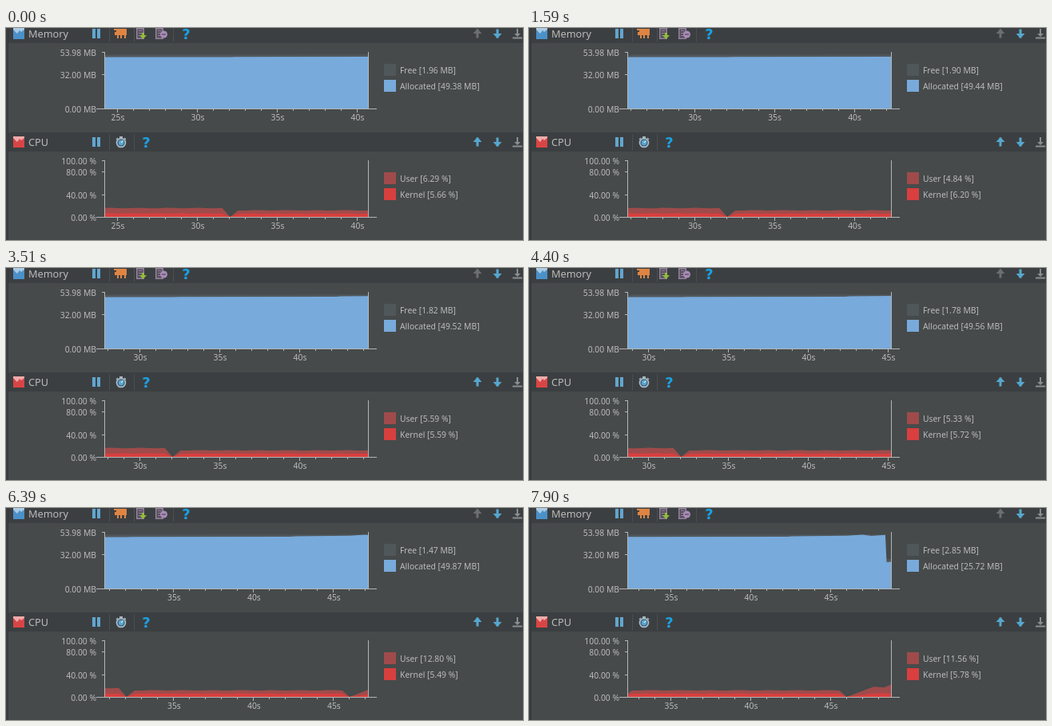
Animation, 647 px wide and 266 px high, one loop 7.99 s. Source, as an HTML page with a canvas:

```html
<!DOCTYPE html>
<html lang="en">
<head>
<meta charset="utf-8">
<title>Memory and CPU monitor</title>
<style>
html, body { margin: 0; width: 100%; height: 100%; overflow: hidden; background: #464a4a; }
canvas { display: block; width: 647px; height: 266px; }
</style>
</head>
<body>
<canvas id="stage"></canvas>
<script>
const W = 647, H = 266;
const LOOP = 7990, STEP_MS = 87.8, STEP_LEAD = 16;
const START_SEC = 40.675, STEP_SEC = 0.09;
const LEFT = 123, RIGHT = 453, PX_PER_SEC = 20, PLOT_H = 71;
const FONT = '"Noto Sans", "Open Sans", sans-serif';
const C = {
  head: '#3c3f41', body: '#464a4a', edge: '#343738', text: '#bbbbbb', axis: '#b4b6b6',
  free: '#50575b', alloc: '#78aadb', user: '#a04b4b', kernel: '#d93f3f',
  blue: '#56a8d0', pause: '#62a6d0', help: '#1ba1e2', gray: '#8a8d8e', off: '#6c6f70',
  orange: '#df8544', purple: '#95809f', green: '#91bd3a'
};

// Legend key points: second, allocated MB, user %, kernel %
const READINGS = [
  [40.5, 49.38, 6.29, 5.66], [41.5, 49.42, 4.65, 5.81], [43, 49.48, 5.23, 6.98],
  [44, 49.52, 5.59, 5.59], [45.5, 49.58, 5.2, 5.78], [46, 50.41, 0, 0],
  [47, 49.87, 12.8, 5.49], [48, 50.4, 12.1, 6.3], [48.5, 25.72, 11.56, 5.78]
];

// Chart series as [second, value]
const allocated = [
  [22, 48.95], [32.1, 48.95], [32.4, 49.3], [42.3, 49.4], [42.6, 49.75], [46, 50.3],
  [47, 51.4], [47.55, 50.1], [48.42, 51.2], [48.5, 25], [49, 25.72]
];
const totalMem = [[22, 51.34], [48.42, 51.6], [48.5, 28], [49, 28.57]];

const DIP = 16;
const totalCpu = [];
for (let k = 0; k < 44; k++) {
  const level = k < DIP ? 15.6 : 11.6;
  totalCpu.push([24.05 + k / 2, k === DIP ? 0 : level + 0.5 * Math.sin(k * 1.7)]);
}
totalCpu.push([46, 0], [47.7, 18], [48.35, 16.5], [48.8, 22]);
const kernelCpu = totalCpu.map(([t, v], k) => [t, Math.min(v / 2, 6 + 0.6 * Math.sin(k * 2.1))]);

const canvas = document.getElementById('stage');
const g = canvas.getContext('2d');
const dpr = window.devicePixelRatio || 1;
canvas.width = W * dpr;
canvas.height = H * dpr;
g.scale(dpr, dpr);

// Readings refresh every half second
function readingAt(sec) {
  const t = Math.min(Math.floor(sec * 2) / 2, READINGS[READINGS.length - 1][0]);
  const i = READINGS.findIndex(row => row[0] >= t);
  const b = READINGS[i], a = READINGS[Math.max(0, i - 1)];
  const f = a === b ? 0 : (t - a[0]) / (b[0] - a[0]);
  return a.map((v, j) => v + (b[j] - v) * f);
}

function rect(x, y, w, h, color) {
  g.fillStyle = color;
  g.fillRect(x, y, w, h);
}

function line(points, color, width = 1) {
  g.beginPath();
  points.forEach(([x, y]) => g.lineTo(x, y));
  g.strokeStyle = color;
  g.lineWidth = width;
  g.stroke();
}

function shape(points, color) {
  g.beginPath();
  points.forEach(([x, y]) => g.lineTo(x, y));
  g.fillStyle = color;
  g.fill();
}

function disc(x, y, r, color) {
  g.beginPath();
  g.arc(x, y, r, 0, Math.PI * 2);
  g.fillStyle = color;
  g.fill();
}

function text(str, x, y, align = 'left', font = `10.35px ${FONT}`, color = C.text) {
  g.font = font;
  g.textAlign = align;
  g.fillStyle = color;
  g.fillText(str, x, y);
}

function separator(x, cy) {
  for (let y = cy - 9; y < cy + 10; y += 2) rect(x, y, 1, 1, '#5c5f60');
}

// dir: -1 points up, 1 points down
function arrow(x, cy, dir, color) {
  rect(x - 1.5, cy - 5.5, 3, 11, color);
  shape([[x - 5.5, cy], [x + 5.5, cy], [x, cy + 6 * dir]], color);
}

function header(name, cy, iconColor, paleColor, upColor) {
  rect(0, cy - 12, W, 24, C.head);
  rect(9, cy - 7, 14, 14, iconColor);
  shape([[9, cy - 7], [23, cy - 7], [23, cy - 5], [19, cy - 2], [17, cy - 4], [14, cy], [9, cy - 5]], paleColor);
  text(name, 28, cy + 5, 'left', `500 12.7px ${FONT}`);
  rect(108, cy - 6, 4, 12, C.pause);
  rect(114, cy - 6, 4, 12, C.pause);
  separator(129, cy);
  separator(160, cy);
  arrow(590, cy, -1, upColor);
  arrow(615, cy, 1, C.blue);
  rect(639, cy - 6, 2, 7, C.gray);
  shape([[636, cy], [644, cy], [640, cy + 4]], C.gray);
  rect(634, cy + 4.5, 12, 2, C.gray);
}

function helpMark(x, cy) {
  text('?', x, cy + 6.5, 'center', 'bold 18px "DejaVu Sans", sans-serif', C.help);
}

function page(x, cy) {
  rect(x, cy - 7, 10, 14, C.purple);
  rect(x + 1.5, cy - 5.5, 7, 11, '#55505a');
  for (const dy of [-4, -1, 2]) rect(x + 3, cy + dy, 4, 1, C.purple);
}

function memoryIcons(cy) {
  rect(138, cy - 6, 13, 8, C.orange);
  rect(135, cy - 6, 3, 2, C.orange);
  rect(136, cy - 2, 2, 4, C.orange);
  for (const x of [139, 143, 148]) rect(x, cy + 2, 2, 4, C.orange);
  page(163, cy);
  rect(170, cy - 1, 3, 5, C.green);
  shape([[167, cy + 2], [176, cy + 2], [171.5, cy + 7]], C.green);
  page(187, cy);
  disc(197.5, cy + 1, 4.5, '#a98bb8');
  rect(195, cy + 0.5, 5, 1, C.head);
  separator(209, cy);
  helpMark(225.5, cy);
}

function cpuIcons(cy) {
  rect(142, cy - 7, 4, 2, '#a9b7bf');
  line([[138, cy - 3], [140, cy - 5]], '#a9b7bf', 1.5);
  line([[148, cy - 5], [150, cy - 3]], '#a9b7bf', 1.5);
  disc(144, cy + 1, 6.3, '#a3bccb');
  disc(144, cy + 1, 4.6, '#47606e');
  disc(144, cy + 1, 3.2, '#55a7d8');
  line([[144, cy + 1], [146.5, cy - 1.5]], '#d4e2ea', 1.2);
  helpMark(175.5, cy);
}

function area(series, base, max, now, color) {
  const toX = t => RIGHT + (t - now) * PX_PER_SEC;
  const pts = series.map(([t, v]) => [toX(t), base - v / max * PLOT_H]);
  pts.push([pts[pts.length - 1][0], base], [pts[0][0], base]);
  shape(pts, color);
}

function plot(base, max, now, layers, labels) {
  const top = base - PLOT_H;
  g.save();
  g.beginPath();
  g.rect(LEFT, top - 1, RIGHT - LEFT, PLOT_H + 2);
  g.clip();
  for (const [series, color] of layers) area(series, base, max, now, color);
  g.restore();

  rect(LEFT, top, 1, PLOT_H, C.axis);
  rect(RIGHT, top, 1, PLOT_H, C.axis);
  rect(113, base, 351, 1, C.axis);
  for (const [str, value] of labels) {
    const y = Math.round(base - value / max * PLOT_H);
    text(str, 113, y + 4.5, 'right');
    if (value) rect(LEFT - 3, y, 3, 1, C.axis);
  }
  const span = (RIGHT - LEFT) / PX_PER_SEC;
  for (let s = Math.ceil(now - span); s <= now; s++) {
    const x = RIGHT + (s - now) * PX_PER_SEC, major = s % 5 === 0;
    rect(Math.floor(x), base, 1, major ? 5 : 3, C.axis);
    if (major) text(s + 's', x + 0.5, base + 14.5, 'center');
  }
}

function legend(y, color, name, value, unit) {
  rect(473, y, 15, 15, color);
  text(`${name} [${value.toFixed(2)} ${unit}]`, 493, y + 11.5);
}

function draw(ms) {
  const now = START_SEC + Math.floor((ms + STEP_LEAD) / STEP_MS) * STEP_SEC;

  rect(0, 0, W, H, C.body);
  header('Memory', 7, '#4b90c8', '#a9cbe4', C.off);
  memoryIcons(7);
  header('CPU', 143, '#d94545', '#efaaaa', C.blue);
  cpuIcons(143);
  rect(0, 0, 2, H, C.head);
  rect(2, 0, 1, H, C.edge);

  plot(101, 53.98, now, [[totalMem, C.free], [allocated, C.alloc]],
    [['53.98 MB', 53.98], ['32.00 MB', 32.5], ['0.00 MB', 0]]);
  plot(237, 100, now, [[totalCpu, C.user], [kernelCpu, C.kernel]],
    [['100.00 %', 100], ['80.00 %', 80], ['40.00 %', 40], ['0.00 %', 0]]);

  // Memory is polled slightly ahead of CPU
  const [, used] = readingAt(now + 0.12);
  const [, , user, kernel] = readingAt(now);
  legend(45, C.free, 'Free', (used < 30 ? 28.57 : 51.34) - used, 'MB');
  legend(65, C.alloc, 'Allocated', used, 'MB');
  legend(181, C.user, 'User', user, '%');
  legend(201, C.kernel, 'Kernel', kernel, '%');
}

const start = performance.now();
function loop() {
  draw((performance.now() - start) % LOOP);
  requestAnimationFrame(loop);
}
loop();
</script>
</body>
</html>
```
